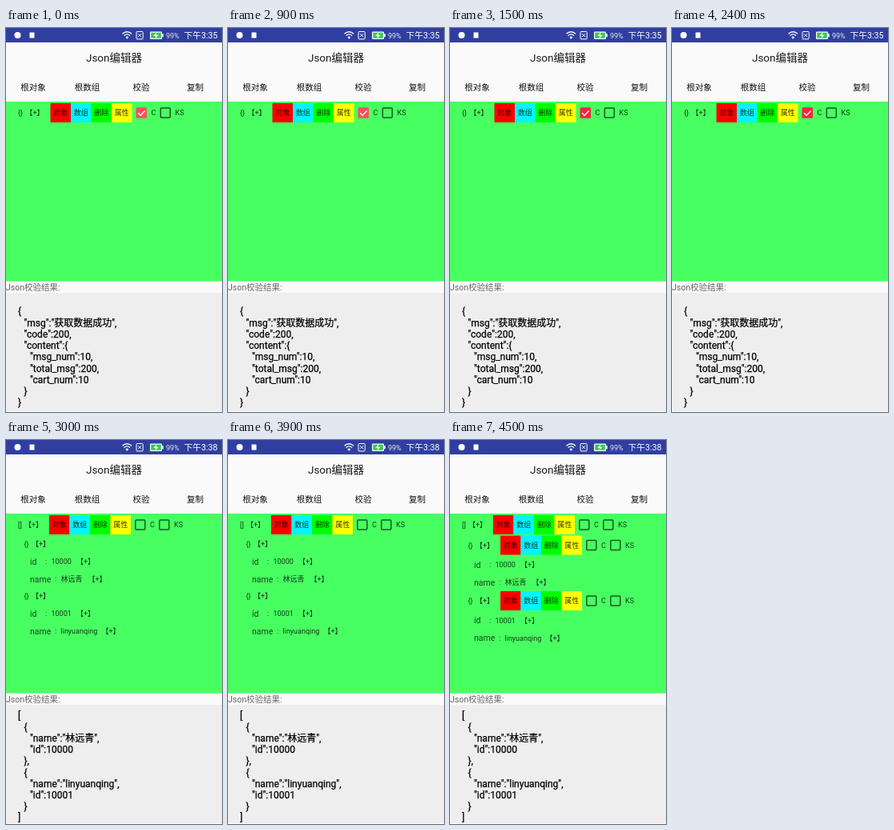
Recreate the animation shown at these times as an HTML page. Size 270 by 480 pixels, loop 6000 ms.

```html
<!DOCTYPE html>
<html lang="zh-CN">
<head>
<meta charset="utf-8">
<title>Json编辑器</title>
<style>
html, body { margin: 0; width: 100%; height: 100%; overflow: hidden; background: #fafafa; }
svg { display: block; width: 100%; height: 100%; }
text { font-family: Roboto, "Noto Sans CJK SC", "Noto Sans CJK", sans-serif; white-space: pre; }
</style>
</head>
<body>
<svg id="stage" viewBox="0 0 270 480"></svg>
<script>
const STEP = 1500, GREEN = '#48ff61', INK = 'rgba(0,0,0,.78)';
const stage = document.getElementById('stage');

const rect = (x, y, w, h, fill, extra = '') =>
  `<rect x="${x}" y="${y}" width="${w}" height="${h}" fill="${fill}" ${extra}/>`;
const text = (x, y, s, size = 9, fill = INK, extra = '') =>
  `<text x="${x}" y="${y}" font-size="${size}" fill="${fill}" ${extra}>${s}</text>`;
const line = (d, color, width) =>
  `<path d="${d}" fill="none" stroke="${color}" stroke-width="${width}"/>`;
const centered = 'text-anchor="middle"';

function statusBar(clock) {
  return rect(0, 0, 270, 18, '#303f9f') +
    '<circle cx="14.5" cy="9" r="4" fill="#fff"/>' +
    rect(29.5, 5.5, 6, 7, '#fff') +
    line('M145.5 7.2Q151.3 2.2 157.1 7.2M147.5 9.4Q151.3 6.2 155.1 9.4', '#fff', 1.3) +
    '<path d="M149.3 11.4Q151.3 9.8 153.3 11.4L151.3 13.8Z" fill="#fff"/>' +
    rect(163, 4.5, 8.2, 9.4, 'none', 'stroke="#fff" rx="1"') +
    line('M165.1 7.2l4 4m0-4l-4 4', '#fff', 1) +
    rect(180, 4.5, 15, 9.4, '#fff', 'rx="1"') + rect(195, 7.2, 1.8, 4, '#fff') +
    rect(181.2, 5.7, 12.6, 7, '#35c759') +
    '<path d="M188.8 5l-4.6 5h3l-1 3.6 4.6-4.8h-3.2z" fill="#fff"/>' +
    text(200, 12.5, '99%', 9, '#e4e7f5') +
    text(222.5, 13, '下午' + clock, 10.7, '#fff');
}

function header() {
  return text(135, 42, 'Json编辑器', 13.5, '#1c1c1c', centered) +
    ['根对象', '根数组', '校验', '复制'].map((s, i) =>
      text(34 + 67.5 * i, 77.8, s, 10.5, '#111', centered + ' font-weight="500"')).join('');
}

function checkbox(x, y, color) {
  return color
    ? rect(x, y - 6.8, 13.6, 13.6, color, 'rx="1.5"') +
      line(`M${x + 2.6} ${y + .2}l3 3 5.6-5.8`, '#e4fbe6', 1.5)
    : rect(x + .8, y - 6, 12, 12, 'none', 'rx="1" stroke="rgba(0,0,0,.66)" stroke-width="1.5"');
}

function tools(x, y, checkColor) {
  const cells = [['对象', '#f00'], ['数组', '#00f5ff'], ['删除', '#0f0'], ['属性', '#ff0']];
  return cells.map(([s, fill], i) =>
      rect(x + 25.5 * i, y - 12, 25.5, 24, fill) +
      text(x + 25.5 * i + 12.75, y + 3.2, s, 9, INK, centered)).join('') +
    checkbox(x + 107, y, checkColor) + text(x + 126, y + 3.2, 'C') +
    checkbox(x + 137, y) + text(x + 156, y + 3.2, 'KS');
}

function node(x, y, mark, open, checkColor) {
  const end = x + (mark === '[]' ? 39 : 40.5);
  return text(x, y + 3.2, mark) + text(end - 31, y + 3.2, '【+】') +
    (open ? tools(end, y, checkColor) : '');
}

function field(y, key, value, plusX) {
  const colon = key === 'id' ? 49 : 61;
  return text(30, y + 3.5, key, 10.5, 'rgba(0,0,0,.72)') + text(colon, y + 3.2, ':') +
    text(colon + 7.5, y + 3.2, value) + text(plusX, y + 3.2, '【+】');
}

// Each leading tab is one indent level; the hairline stroke thickens the type.
function result(y, source) {
  return source.split('\n').map((s, i) => {
    const body = s.trimStart();
    const x = 15 + 7.5 * (s.length - body.length);
    return text(x, y + 14.22 * i, body, 12, '#000', 'stroke="#000" stroke-width=".25"');
  }).join('');
}

const people = [['10000', '林远青', 102.5], ['10001', 'linyuanqing', 119.5]];
const message = '{\n\t"msg":"获取数据成功",\n\t"code":200,\n\t"content":{\n' +
  '\t\t"msg_num":10,\n\t\t"total_msg":200,\n\t\t"cart_num":10\n\t}\n}';
const list = '[\n' + people.map(([id, name]) =>
  `\t{\n\t\t"name":"${name}",\n\t\t"id":${id}\n\t}`).join(',\n') + '\n]';

function objectTree(checkColor) {
  return node(15, 106, '{}', true, checkColor);
}

function listTree(open) {
  const [top, first, gap, pitch] = open ? [131.5, 24.5, 22, 69.5] : [130, 22, 22, 65];
  return node(15, 106, '[]', true) + people.map(([id, name, plusX], i) => {
    const y = top + pitch * i;
    return node(22.5, y, '{}', open) +
      field(y + first, 'id', id, 88) + field(y + first + gap, 'name', name, plusX);
  }).join('');
}

function screen(clock, tree, y, json) {
  return rect(0, 0, 270, 480, '#fafafa') + statusBar(clock) + header() +
    rect(0, 92, 270, 224.6, GREEN) + tree +
    text(0, 328, 'Json校验结果:', 10.5, '#666') +
    rect(1, 331, 269, 148, '#eee') + result(y, json);
}

const screens = [
  screen('3:35', objectTree('#f8505f'), 358.4, message),
  screen('3:35', objectTree('#f42640'), 358.4, message),
  screen('3:38', listTree(false), 348.5, list),
  screen('3:38', listTree(true), 348.5, list)
];

let shown = -1;
function tick() {
  const i = Math.floor(performance.now() / STEP) % screens.length;
  if (i !== shown) stage.innerHTML = screens[shown = i];
  requestAnimationFrame(tick);
}
tick();
</script>
</body>
</html>
```
